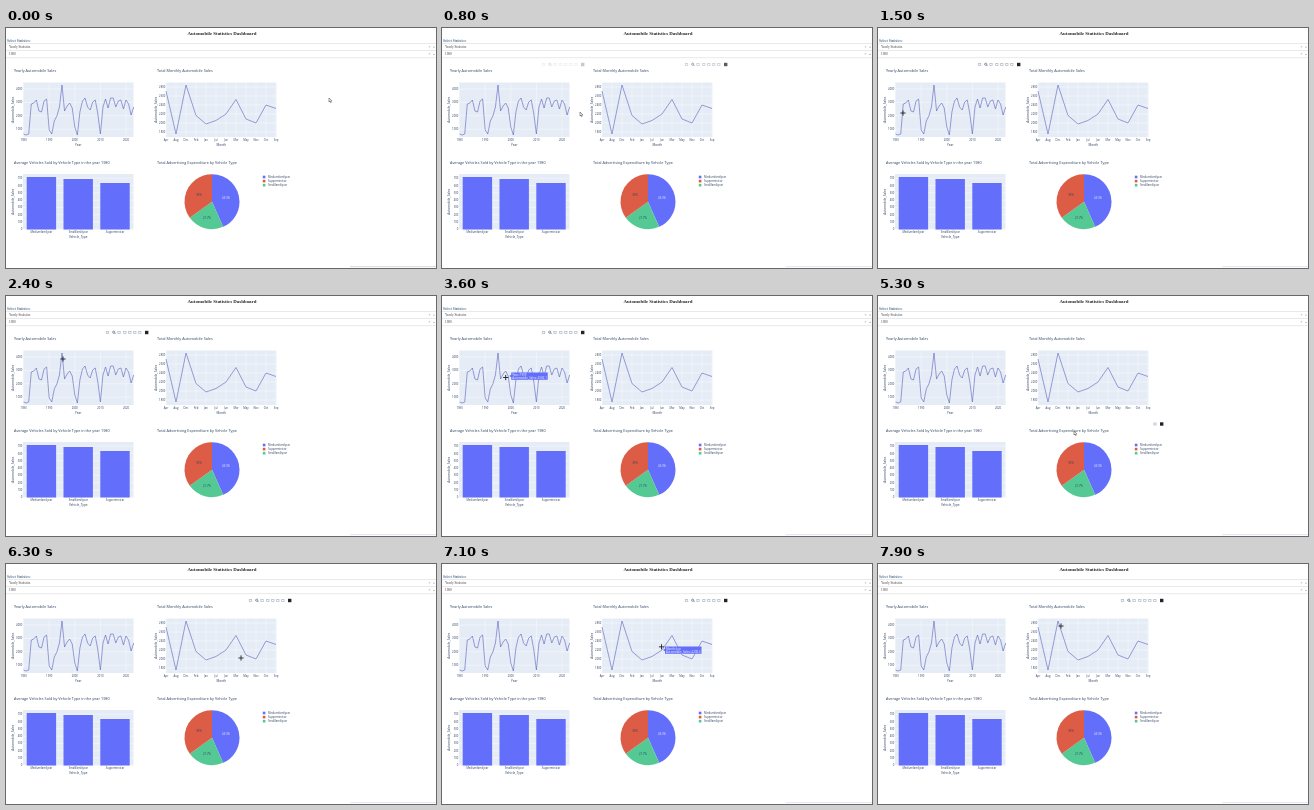
An HTML page with a canvas for the animation above (8000 ms loop, 430 px wide and 240 px high).

```html
<!DOCTYPE html>
<html lang="en">
<head>
<meta charset="utf-8">
<title>Automobile Statistics Dashboard</title>
<style>
html, body { margin: 0; width: 100%; height: 100%; overflow: hidden; background: #fff; }
canvas { display: block; width: 430px; height: 240px; }
</style>
</head>
<body>
<canvas id="stage"></canvas>
<script>
const LOOP = 8000, STEP = 100;
const INK = '#2a3f5f', BLUE = '#636efa', RED = '#dc5c46', GREEN = '#54c993', PLOT = '#e5ecf6';
const SANS = '"Open Sans", sans-serif', SERIF = '"Liberation Serif", serif';
const canvas = document.getElementById('stage');
const dpr = window.devicePixelRatio || 1;
canvas.width = 430 * dpr;
canvas.height = 240 * dpr;
const c = canvas.getContext('2d');

const plots = {
  yearly: { x: 17, y: 54.5, w: 110.5, h: 54.5 },
  monthly: { x: 160, y: 54.5, w: 110.5, h: 54.5 },
  bars: { x: 17, y: 146, w: 110.5, h: 55.5 }
};
const months = 'Apr Aug Dec Feb Jan Jul Jun Mar May Nov Oct Sep'.split(' ');
const types = ['Mediumfamilycar', 'Smallfamiliycar', 'Supperminicar'];
const yearly = [106, 107, 106, 76, 75, 72, 83, 84, 73, 71, 102, 106, 93, 88, 79, 57, 83, 78,
  75, 80, 99, 107, 84, 73, 70, 79, 82, 74, 72, 86, 106, 79, 71, 80, 70, 70, 79, 73, 72, 81, 72, 76, 87, 79]
  .map((y, i) => [17.6 + i * 2.56, y]);
const monthly = [63, 106, 57, 87.5, 96, 92.5, 86, 71.5, 91, 95, 77, 80.5]
  .map((y, i) => [160 + i * 10, y]);

// Pointer path: time, x, y
const path = [[0, 323, 71], [400, 250, 73], [900, 110, 88], [1500, 25, 85], [2400, 57, 63],
  [2900, 59, 66], [3600, 63.7, 81.5], [4000, 68, 105], [4300, 98, 152], [4600, 152, 166],
  [5100, 183, 150], [5700, 222, 108], [6300, 235, 94], [7000, 222, 85], [7600, 207, 72],
  [7700, 207, 72], [7900, 183, 62], [8000, 183, 62]];

function pointerAt(t) {
  const i = path.findIndex(p => p[0] > t);
  const a = path[i - 1], b = path[i], k = (t - a[0]) / (b[0] - a[0]);
  return [a[1] + (b[1] - a[1]) * k, a[2] + (b[2] - a[2]) * k];
}

// Glyphs are laid out large and scaled down to keep fractional advances
function text(str, x, y, size, { align = 'center', color = INK, font = SANS, weight = 400, turn = 0 } = {}) {
  c.save();
  c.translate(x, y);
  c.rotate(turn);
  c.scale(0.1, 0.1);
  c.font = `${weight} ${size * 10}px ${font}`;
  c.textAlign = align;
  c.textBaseline = 'alphabetic';
  c.fillStyle = color;
  c.fillText(str, 0, 0);
  c.restore();
}

function rect(x, y, w, h, color) {
  c.fillStyle = color;
  c.fillRect(x, y, w, h);
}

function line(points, color, width) {
  c.beginPath();
  points.forEach(p => c.lineTo(...p));
  c.strokeStyle = color;
  c.lineWidth = width;
  c.stroke();
}

function axes({ x, y, w, h }, xTicks, yTicks, xTitle) {
  rect(x, y, w, h, PLOT);
  for (const [label, tx, grid] of xTicks) {
    if (grid) line([[tx, y], [tx, y + h]], '#fff', 0.4);
    text(label, tx, y + h + 3.7, 2.7);
  }
  for (const [label, ty] of yTicks) {
    line([[x, ty], [x + w, ty]], '#fff', 0.4);
    text(label, x - 0.7, ty + 1, 2.7, { align: 'right' });
  }
  text(xTitle, x + w / 2, y + h + 8.6, 3.15);
  text('Automobile_Sales', x - 9, y + h / 2, 3.15, { turn: -Math.PI / 2 });
}

function header() {
  text('Automobile Statistics Dashboard', 216, 7.3, 4.9, { font: SERIF, weight: 700, color: '#222' });
  text('Select Statistics:', 1, 14.4, 3.58, { font: SERIF, align: 'left', color: '#173f66' });
  for (const y of [15.5, 22.5, 29.7]) line([[0, y], [430, y]], '#d2d2d2', 0.5);
  ['Yearly Statistics', '1980'].forEach((label, i) => {
    const y = 19.1 + i * 7.3;
    text(label, 3, y + 1, 3.3, { font: SERIF, align: 'left', color: '#444' });
    text('×', 423.5, y + 1, 3.5, { color: '#888' });
    line([[427, y - 0.4], [428, y + 0.5], [429, y - 0.4]], '#888', 0.5);
  });
}

function pie() {
  const cx = 206, cy = 173.7, r = 27.5;
  const slices = [[0, 156, BLUE], [156, 234, GREEN], [234, 360, RED]];
  for (const [from, to, color] of slices) {
    c.beginPath();
    c.moveTo(cx, cy);
    c.arc(cx, cy, r, (from - 90) * Math.PI / 180, (to - 90) * Math.PI / 180);
    c.fillStyle = color;
    c.fill();
  }
  text('43.3%', 220, 171.3, 2.8, { color: '#fff' });
  text('35%', 193, 168.3, 2.8);
  text('21.7%', 201, 191, 2.8);
  [[types[0], BLUE], [types[2], RED], [types[1], GREEN]].forEach(([label, color], i) => {
    const y = 149 + i * 4.1;
    rect(256.8, y - 1.3, 2.6, 2.6, color);
    text(label, 262, y + 1, 2.7, { align: 'left' });
  });
}

function charts() {
  text('Yearly Automobile Sales', 8, 44.3, 3.8, { align: 'left' });
  text('Total Monthly Automobile Sales', 151, 44.3, 3.8, { align: 'left' });
  text('Average Vehicles Sold by Vehicle Type in the year 1980', 8, 136, 3.8, { align: 'left' });
  text('Total Advertising Expenditure by Vehicle Type', 151, 136, 3.8, { align: 'left' });

  axes(plots.yearly,
    [1980, 1990, 2000, 2010, 2020].map((v, i) => [v, 17.6 + i * 25.6, true]),
    [1, 2, 3, 4].map(v => [v * 1000, 114.6 - v * 13.4]), 'Year');
  line(yearly, '#5a62bd', 0.6);

  axes(plots.monthly,
    months.map((m, i) => [m, 160 + i * 10, true]),
    [0, 1, 2, 3, 4, 5].map(i => [2800 - i * 200, 59 + i * 9]), 'Month');
  line(monthly, '#5a62bd', 0.6);

  axes(plots.bars,
    types.map((name, i) => [name, 35.4 + i * 36.8, false]),
    [0, 1, 2, 3, 4, 5, 6, 7].map(i => [i * 100, 201.3 - i * 7.3]), 'Vehicle_Type');
  [149, 151, 155].forEach((y, i) => rect(20.7 + i * 36.8, y, 29.4, 201.5 - y, BLUE));
  pie();
}

// Chart panel under a point: 0 and 1 on top, 2 and 3 below
function panelAt([x, y]) {
  if (x > 287 || y < 32) return -1;
  return (x > 150 ? 1 : 0) + (y > 125 ? 2 : 0);
}

const groups = [
  [101.5, 108, 113, 118.8, 123.8, 128.8, 133.8],
  [101.5, 108, 113, 118.8, 123.8, 128.8, 133.8],
  [92, 98, 103, 108, 113, 118.8, 123.8, 128.8, 133.8],
  [134]
];

function toolbar(panel, alpha) {
  const dx = panel % 2 ? 143 : 0, y = panel > 1 ? 128 : 36.5;
  c.globalAlpha = alpha;
  groups[panel].forEach((x, i) => {
    c.strokeStyle = i === 1 ? '#64748b' : '#b9c0ca';
    c.lineWidth = 0.8;
    if (i === 1) {
      c.beginPath();
      c.arc(x + dx - 0.3, y - 0.3, 1.1, 0, 7);
      c.stroke();
      line([[x + dx + 0.5, y + 0.5], [x + dx + 1.6, y + 1.6]], '#64748b', 0.8);
    } else {
      c.strokeRect(x + dx - 1.2, y - 1, 2.4, 2);
    }
  });
  rect(139 + dx, y - 1.7, 3.4, 3.4, '#20242b');
  c.globalAlpha = 1;
}

function tooltip(points, px, py, describe) {
  const i = points.findIndex(([x, y]) => Math.hypot(x - px, y - py) < 4);
  if (i < 0) return;
  const [x, y] = points[i];
  c.beginPath();
  [[x + 1, y], [x + 3, y - 1.2], [x + 3, y - 3.6], [x + 39.5, y - 3.6],
    [x + 39.5, y + 3.8], [x + 3, y + 3.8], [x + 3, y + 1.2]].forEach(p => c.lineTo(...p));
  c.fillStyle = BLUE;
  c.fill();
  describe(i).forEach((row, k) =>
    text(row, x + 4, y - 0.5 + k * 3.3, 2.9, { align: 'left', color: '#fff' }));
}

function pointer(x, y) {
  const onPlot = Object.values(plots).some(p =>
    x > p.x && x < p.x + p.w && y > p.y && y < p.y + p.h);
  if (onPlot) {
    line([[x - 2.6, y], [x + 2.6, y]], '#222', 0.9);
    line([[x, y - 2.6], [x, y + 2.6]], '#222', 0.9);
    return;
  }
  c.beginPath();
  [[0, 0], [0, 4], [0.9, 3.2], [1.6, 4.6], [2.2, 4.3], [1.6, 3], [2.8, 2.9]]
    .forEach(([dx, dy]) => c.lineTo(x + dx, y + dy - 1));
  c.closePath();
  c.fillStyle = '#fff';
  c.fill();
  c.strokeStyle = '#333';
  c.lineWidth = 0.5;
  c.stroke();
}

function draw(t) {
  c.setTransform(dpr, 0, 0, dpr, 0, 0);
  rect(0, 0, 430, 240, '#fff');
  header();
  charts();
  rect(344, 238.3, 86, 0.8, t < STEP ? '#cfcfcf' : '#dcdff0');

  // Toolbars fade over the last few steps
  const fade = [0, 0, 0, 0];
  for (let k = 0; k < 4; k++) {
    const panel = panelAt(pointerAt(Math.max(0, t - k * STEP)));
    if (panel >= 0) fade[panel] += 0.25;
  }
  fade.forEach((alpha, panel) => alpha && toolbar(panel, alpha));

  const [x, y] = pointerAt(t);
  tooltip(yearly, x, y, i => [`Year=${1980 + i}`,
    `Automobile_Sales=${((114.6 - yearly[i][1]) / 13.4 * 1000).toFixed(1)}`]);
  tooltip(monthly, x, y, i => [`Month=${months[i]}`,
    `Automobile_Sales=${(2800 - (monthly[i][1] - 59) * 22.2).toFixed(1)}`]);
  pointer(x, y);
}

function tick() {
  const t = performance.now() % LOOP;
  draw(Math.floor(t / STEP) * STEP);
  requestAnimationFrame(tick);
}
tick();
</script>
</body>
</html>
```
